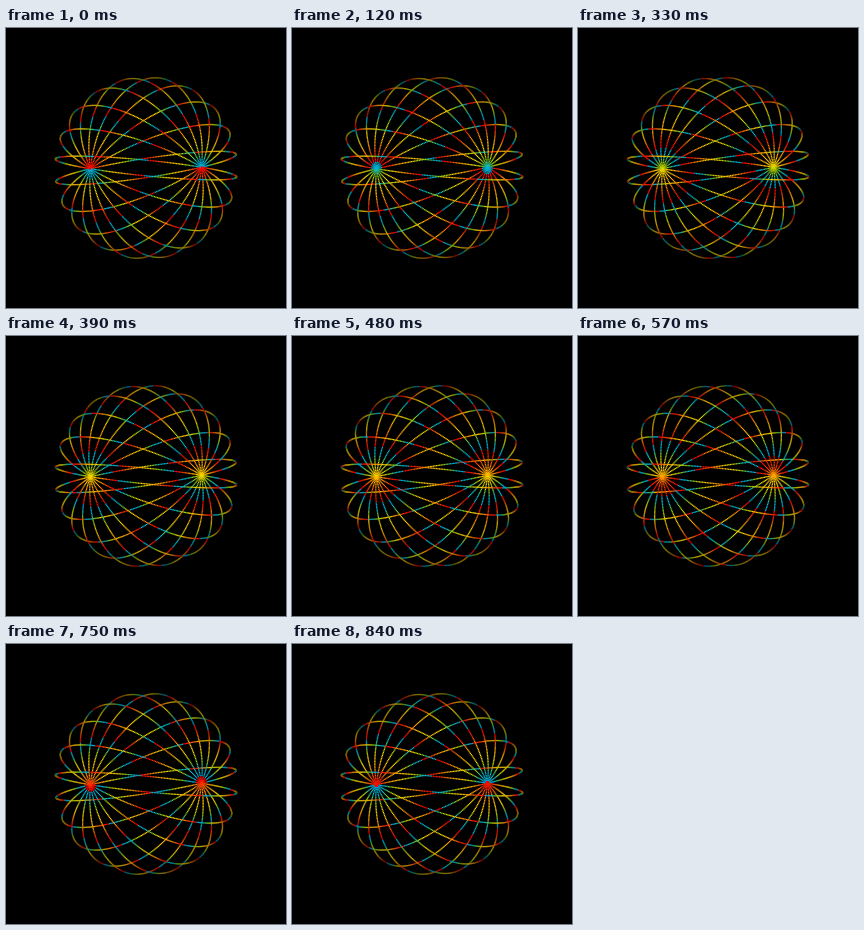
An HTML page with a canvas that plays this animation: 280 by 280 pixels, repeating every 0.87 s.

```html
<!DOCTYPE html>
<html lang="en">
<head>
<meta charset="utf-8">
<title>Dotted sphere</title>
<style>
  html, body { margin: 0; width: 100%; height: 100%; overflow: hidden; background: #000; }
  canvas { display: block; width: 280px; height: 280px; }
</style>
</head>
<body>
<canvas id="stage" width="280" height="280"></canvas>
<script>
  const ctx = document.getElementById('stage').getContext('2d');
  const STEPS = 29, STEP_MS = 30;
  const RINGS = 10, CYCLES = 10, DOTS = 360;
  const R = 91, CX = 140, CY = 140, SIZE = 1.3;
  const HUES = 72, SHADES = 12;
  const rad = deg => deg * Math.PI / 180;

  // Red to cyan, then a hard jump back to red.
  const stops = [[255, 0, 0], [255, 45, 0], [255, 140, 0], [255, 190, 0],
                 [245, 215, 0], [160, 205, 0], [0, 185, 200], [0, 175, 220]];

  function color(hue, light) {
    const p = hue * (stops.length - 1);
    const a = Math.min(Math.floor(p), stops.length - 2);
    const mix = stops[a].map((v, c) => Math.round(light * (v + (stops[a + 1][c] - v) * (p - a))));
    return `rgb(${mix})`;
  }

  // One palette per brightness: dots near the silhouette are darker.
  const palettes = Array.from({ length: SHADES }, (_, s) =>
    Array.from({ length: HUES }, (_, h) => color(h / (HUES - 1), 0.45 + 0.55 * s / (SHADES - 1))));

  // Great circles through both poles of a tilted sphere.
  const sinT = 0.61, cosT = Math.sqrt(1 - sinT * sinT);
  const sinR = Math.sin(rad(0.8)), cosR = Math.cos(rad(0.8));
  const dots = [];
  for (let k = 0; k < RINGS; k++) {
    const phi = rad(9.9 + k * 180 / RINGS);
    for (let j = 0; j < DOTS; j++) {
      const s = j / DOTS * 2 * Math.PI;
      const side = Math.cos(phi) * Math.sin(s);
      const x = cosT * side - sinT * Math.cos(s);
      const y = -Math.sin(phi) * Math.sin(s);
      const z = sinT * side + cosT * Math.cos(s);
      const light = Math.min(1, 1.3 * Math.abs(z));
      dots.push({
        x: CX + R * (x * cosR + y * sinR) - SIZE / 2,
        y: CY + R * (y * cosR - x * sinR) - SIZE / 2,
        palette: palettes[Math.round(light * (SHADES - 1))],
        phase: j * CYCLES / DOTS % 1
      });
    }
  }

  function draw() {
    // The extra millisecond absorbs timer rounding.
    const step = Math.floor((performance.now() + 1) / STEP_MS) % STEPS;
    const shift = 1 - step / STEPS;
    ctx.fillStyle = '#000';
    ctx.fillRect(0, 0, 280, 280);
    for (const d of dots) {
      ctx.fillStyle = d.palette[Math.floor((d.phase + shift) % 1 * HUES)];
      ctx.fillRect(d.x, d.y, SIZE, SIZE);
    }
    requestAnimationFrame(draw);
  }
  draw();
</script>
</body>
</html>
```
